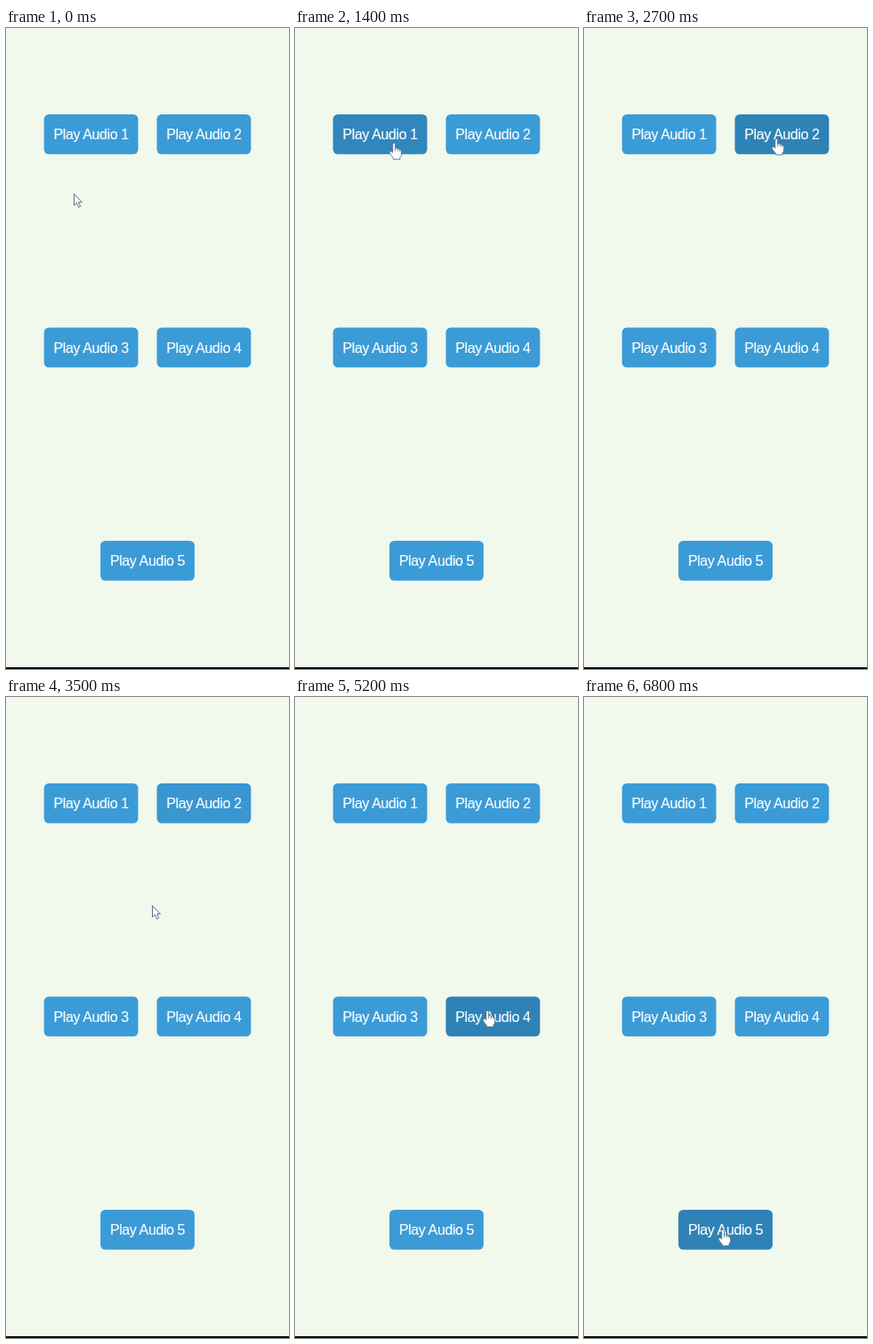
These frames come from a looping animation (318 by 720 pixels, 8000 ms). An HTML page:

```html
<!DOCTYPE html>
<html lang="en">
<head>
<meta charset="utf-8">
<title>Audio buttons</title>
<style>
  html, body { margin: 0; width: 100%; height: 100%; overflow: hidden; background: #f1f8ec; }
  svg { display: block; width: 100vw; height: 100vh; }
  text {
    font: 16px "Liberation Sans", Arial, sans-serif; letter-spacing: -.4px;
    fill: #f6fbfd; stroke: #f6fbfd; stroke-width: .2; text-anchor: middle;
  }
</style>
</head>
<body>
<svg viewBox="0 0 318 720">
  <rect width="318" height="720" fill="#f1f8ec"/>
  <g id="buttons"></g>
  <rect y="718" width="318" height="2" fill="#050805"/>
  <g id="cursor" stroke-linejoin="round">
    <path id="arrow" fill="#fbfdff" stroke="#56627c" stroke-width=".9"
      d="M.5 .5V13.2L3.4 10.5L5.6 15.3L7.7 14.4L5.5 9.7H9.4Z"/>
    <g id="hand" stroke="#4a6a82" stroke-width=".8">
      <path fill="#fff"
        d="M-2.2 1.7Q-2.2 .3-.8 .3T.7 1.7V6Q3.1 5.3 3.4 6.8Q5.4 6.2 5.8 7.7Q7.6 7.4 7.6 9.3V13Q7.6 14.8 6 16.4V18.4H-1.6V17Q-4.2 14.2-5.6 11.4Q-6.4 9.6-5 9.2Q-3.8 9-2.2 11Z"/>
      <path fill="none" d="M.7 6V9.2M3.4 6.8V9.4M5.8 7.7V9.9"/>
    </g>
  </g>
</svg>
<script>
const LOOP = 8000, STEP = 100;
const WIDTH = 105.8, HEIGHT = 44.8;
const BASE = [59, 155, 215], DARK = [47, 130, 181];
const FADE = [.5, .3, .2]; // share of the hover fade done in each step

const START = [76, 186];
const moves = [
  { at: 900, dur: 300, to: [112, 129], bend: [43, 17] },
  { at: 2100, dur: 150, to: [217, 124], bend: [0, 0] },
  { at: 3150, dur: 700, to: [122, 352], bend: [-11, -8] },
  { at: 4400, dur: 400, to: [217, 352], bend: [0, 0] },
  { at: 5400, dur: 450, to: [157, 598], bend: [0, 0] }
];

const byId = id => document.getElementById(id);
const lerp = (a, b, k) => a + (b - a) * k;
const smooth = v => {
  const k = Math.min(1, Math.max(0, v));
  return k * k * (3 - 2 * k);
};

function add(tag, attrs) {
  const el = document.createElementNS("http://www.w3.org/2000/svg", tag);
  for (const key in attrs) el.setAttribute(key, attrs[key]);
  return byId("buttons").appendChild(el);
}

// two buttons per row, the last one centred
const buttons = Array.from({ length: 5 }, (_, i) => {
  const mid = i === 4 ? 159 : 95.6 + 126.8 * (i % 2);
  const x = mid - WIDTH / 2, y = 97 + 239.5 * Math.floor(i / 2);
  const box = add("rect", { x, y, width: WIDTH, height: HEIGHT, rx: 5.5 });
  add("text", { x: mid, y: y + 28 }).textContent = "Play Audio " + (i + 1);
  return { x, y, box };
});

// each move is a gently bent curve from the previous resting place
function pointer(t) {
  let pos = START;
  for (const { at, dur, to, bend } of moves) {
    if (t <= at) break;
    const k = smooth((t - at) / dur);
    pos = pos.map((p, i) => lerp(p, to[i], k) + 2 * k * (1 - k) * bend[i]);
  }
  return pos;
}

function isOver(button, t) {
  const [x, y] = pointer(t);
  return x > button.x && x < button.x + WIDTH && y > button.y && y < button.y + HEIGHT;
}

function draw(t) {
  for (const b of buttons) {
    const k = FADE.reduce((sum, part, i) => sum + part * isOver(b, t - (i + 1) * STEP), 0);
    b.box.setAttribute("fill", `rgb(${BASE.map((c, i) => Math.round(lerp(c, DARK[i], k)))})`);
  }
  const over = buttons.some(b => isOver(b, t));
  byId("cursor").setAttribute("transform", `translate(${pointer(t)})`);
  byId("arrow").style.display = over ? "none" : "";
  byId("hand").style.display = over ? "" : "none";
}

const origin = performance.now();
function tick() {
  const t = (performance.now() - origin) % LOOP;
  draw(Math.floor(t / STEP) * STEP);
  requestAnimationFrame(tick);
}
tick();
</script>
</body>
</html>
```
